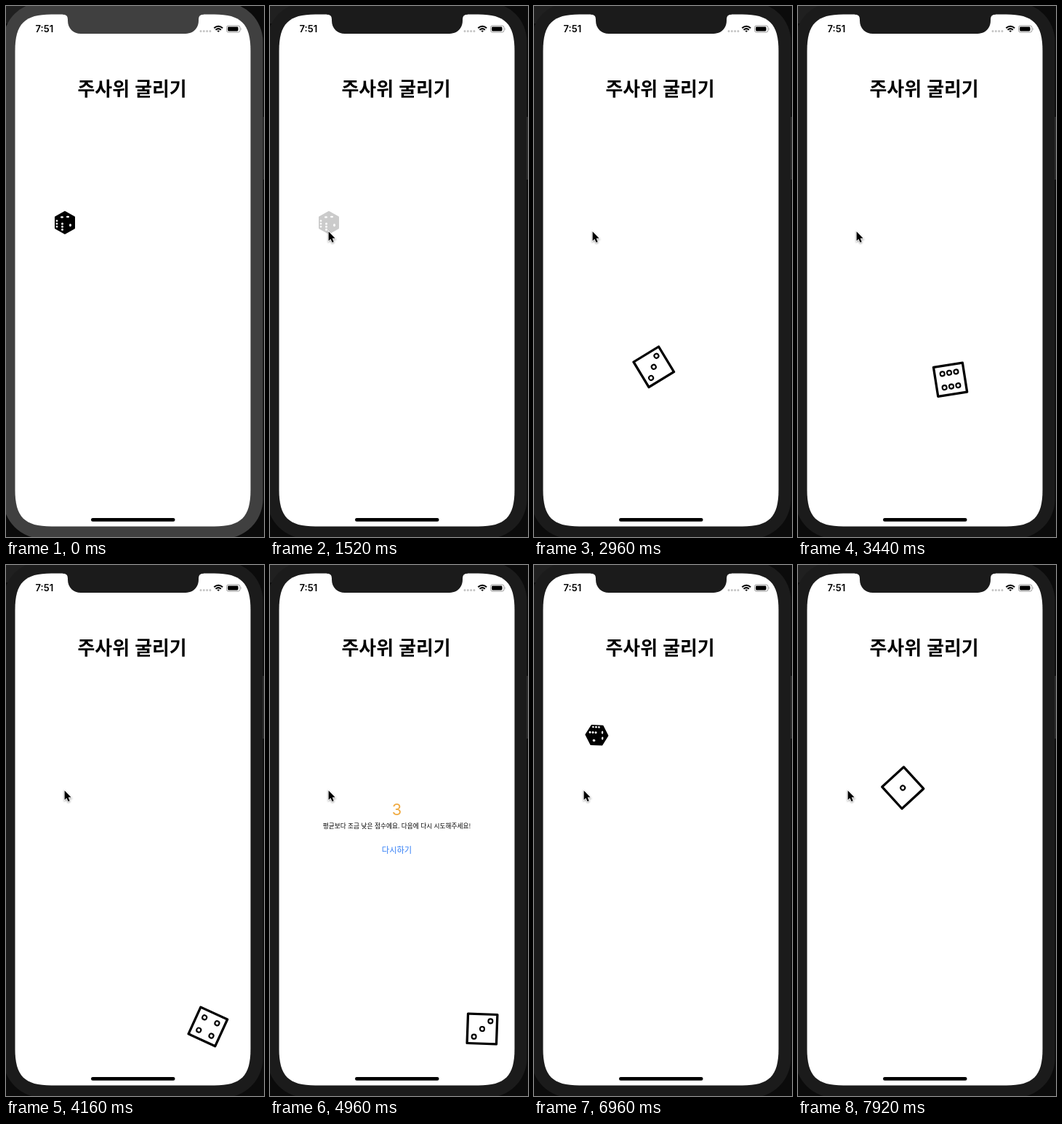
An HTML page for the animation above (8000 ms loop, 355 px wide and 728 px high).

```html
<!DOCTYPE html>
<html lang="ko">
<head>
<meta charset="utf-8">
<title>주사위 굴리기</title>
<style>
  html, body { margin: 0; width: 100%; height: 100%; overflow: hidden; background: #0b0b0b; }
  svg { display: block; width: 355px; height: 728px; }
  text { font-family: "Noto Sans CJK KR", "Noto Sans CJK", "Noto Sans CJK JP", sans-serif; text-anchor: middle; }
  .latin { font-family: Inter, sans-serif; }
  .outline { fill: none; stroke: #000; stroke-linejoin: round; }
  .bezel { fill: #404040; }
</style>
</head>
<body>
<svg viewBox="0 0 355 728">
  <rect width="355" height="728" fill="#0b0b0b"/>
  <rect width="30" height="24" fill="#202020"/>
  <rect class="bezel" x="-4" y="-5" width="357.5" height="735" rx="54"/>
  <rect x="353" y="152" width="2" height="86" fill="#2a2a2a"/>
  <path fill="#fff" d="M12.5 61.5C12.5 24.5 25.5 11.5 62.5 11.5H286.5C323.5 11.5 336.5 24.5 336.5 61.5
    V663.5C336.5 700.5 323.5 713.5 286.5 713.5H62.5C25.5 713.5 12.5 700.5 12.5 663.5Z"/>
  <path class="bezel" d="M78 10V11.5Q85 11.5 85 18V20C85 31 93 38 103 38H247C257 38 265 31 265 20V18Q265 11.5 272 11.5V10Z"/>

  <text class="latin" x="52.8" y="36" font-size="13" font-weight="600">7:51</text>
  <path d="M268 34.5H281.5" stroke="#c4c4c4" stroke-width="3" stroke-linecap="round" stroke-dasharray="0 4.3"/>
  <g class="outline" stroke-width="2">
    <path d="M286.3 30.3Q292.2 25.2 298.1 30.3M288.5 32.7Q292.2 29.6 295.9 32.7"/>
    <path d="M290.4 34L292.2 36L294 34Q292.2 32.8 290.4 34Z" fill="#000" stroke="none"/>
  </g>
  <rect x="303.5" y="27" width="18.5" height="9" rx="2.6" fill="none" stroke="#999"/>
  <rect x="305" y="28.5" width="14.5" height="6" rx="1.4"/>
  <path d="M323.2 30V33.2Q324.6 31.6 323.2 30Z" fill="#999"/>

  <text x="173.6" y="122.7" font-size="25.9" font-weight="700">주사위 굴리기</text>
  <rect x="117" y="702.1" width="115.5" height="4.7" rx="2.3"/>

  <g id="result">
    <text class="latin" y="-26" font-size="29" fill="#f0ab42">3</text>
    <text y="-1.8" font-size="11.6">평균보다 조금 낮은 점수에요. 다음에 다시 시도해주세요!</text>
    <text id="retry" y="43.5" font-size="15" fill="#2f7cf6">다시하기</text>
  </g>

  <g id="die">
    <g id="cube">
      <path d="M0 -15L13 -7.6V7.6L0 15L-13 7.6V-7.6Z" stroke="#000" stroke-width="2" stroke-linejoin="round"/>
      <g id="cubePips" fill="#fff">
        <ellipse cx="-4" cy="-7.5" rx="2.1" ry="1.2"/>
        <ellipse cx="4" cy="-8" rx="2.1" ry="1.2"/>
        <ellipse cx="7.5" cy="3.5" rx="1.5" ry="1.9"/>
      </g>
    </g>
    <g id="face" class="outline">
      <rect x="-20.2" y="-20.2" width="40.4" height="40.4" stroke-width="3.3"/>
      <g id="facePips" stroke-width="2.1"></g>
    </g>
  </g>

  <path id="cursor" d="M0 0V12.8L2.8 10.2L5 15L7.1 14L5.1 9.4H9Z" stroke="#fff" stroke-width="1.6"
    paint-order="stroke" style="filter: drop-shadow(0 1px 1px #0006)"/>
</svg>
<script>
const LOOP = 8000, STEP = 80, RESET = 5920, SECOND_ROLL = 5200, FACE_TIME = 173;
const ROLL_START = 1540, PEAK = 2400, ROLL_END = 4320, SPIN = 0.4216;
const $ = id => document.getElementById(id);

const progress = (t, from, to) => Math.min(1, Math.max(0, (t - from) / (to - from)));
const easeOut = (u, power) => 1 - (1 - u) ** power;
const easeInOut = u => u ** 3 * (10 - 15 * u + 6 * u * u);
const mix = (a, b, u) => a + (b - a) * u;

const bezier = (u, a, b, c, d) =>
  a * (1 - u) ** 3 + 3 * b * u * (1 - u) ** 2 + 3 * c * u * u * (1 - u) + d * u ** 3;

const circle = (x, y, r) => `<circle cx="${x}" cy="${y}" r="${r}"/>`;
const show = (id, on) => $(id).setAttribute("display", on ? "inline" : "none");
const place = (id, transform) => $(id).setAttribute("transform", transform);

for (let row = 0; row < 3; row++) {
  const y = row * 4 - 2.5;
  $("cubePips").innerHTML += circle(-11, y, 1.35) + circle(-3.5, y + 4, 1.5);
}

function pips(n) {
  const spread = n < 4 ? 11 : 9.5;
  const pair = (x, y) => circle(x, y, 3) + circle(-x, -y, 3);
  return (n % 2 ? circle(0, 0, 3) : "")
    + (n > 1 ? pair(spread, spread) : "")
    + (n > 3 ? pair(spread, -spread) : "")
    + (n === 6 ? pair(spread, 0) : "");
}

let shownFace = 0;
function setFace(n) {
  if (n === shownFace) return;
  shownFace = n;
  $("facePips").innerHTML = pips(n);
}

// The die is tossed up, drops, then slides into the corner.
function drawDie(time) {
  const t = time < RESET ? time : time - SECOND_ROLL;
  const x = bezier(progress(t, ROLL_START, ROLL_END), 81, 96, 212, 292);
  const y = 297
    - 178 * easeOut(progress(t, ROLL_START, PEAK), 1.5)
    + 384 * easeInOut(progress(t, PEAK, 3050))
    + 133 * easeInOut(progress(t, 3200, ROLL_END));
  const angle = SPIN * (Math.min(Math.max(t, ROLL_START), ROLL_END) - ROLL_START);
  place("die", `translate(${x} ${y}) rotate(${angle})`);

  const pressed = t >= 1520 && t < 1600, flat = t >= 1840;
  $("die").setAttribute("opacity", pressed ? 0.2 : 1);
  show("cube", !flat);
  show("face", flat);
  const turn = Math.floor((t - 2380) / FACE_TIME) + 5;
  setFace(t >= ROLL_END ? 3 : (turn + 6) % 6 + 1);
}

function drawResult(t) {
  const u = progress(t, 4460, 5460);
  show("result", u > 0 && t < RESET);
  place("result", `translate(174.5 362.5) scale(${easeOut(u, 2)})`);
  $("retry").setAttribute("opacity", t >= 5840 ? 0.2 : 1);
}

const glides = [
  { from: 400, to: 560, x: 85, y: 150 },
  { from: 720, to: 880, x: 113, y: 237 },
  { from: 960, to: 1360, x: 80, y: 308 },
  { from: 4960, to: 5520, x: 177, y: 398 },
  { from: 6080, to: 6480, x: 68, y: 308 }
];

function drawPointer(t) {
  let x = 227, y = 218;
  for (const glide of glides) {
    const u = easeInOut(progress(t, glide.from, glide.to));
    x = mix(x, glide.x, u);
    y = mix(y, glide.y, u);
  }
  show("cursor", t >= 480);
  place("cursor", `translate(${x + 0.6} ${y + 1.2})`);
}

function draw(now) {
  const t = Math.floor((now % LOOP) / STEP) * STEP;
  const shade = t < 1520 ? "#404040" : "#1b1b1b";
  document.querySelectorAll(".bezel").forEach(el => el.style.fill = shade);
  drawDie(t);
  drawResult(t);
  drawPointer(t);
}

const start = performance.now();
function tick() {
  draw(performance.now() - start);
  requestAnimationFrame(tick);
}
tick();
</script>
</body>
</html>
```
